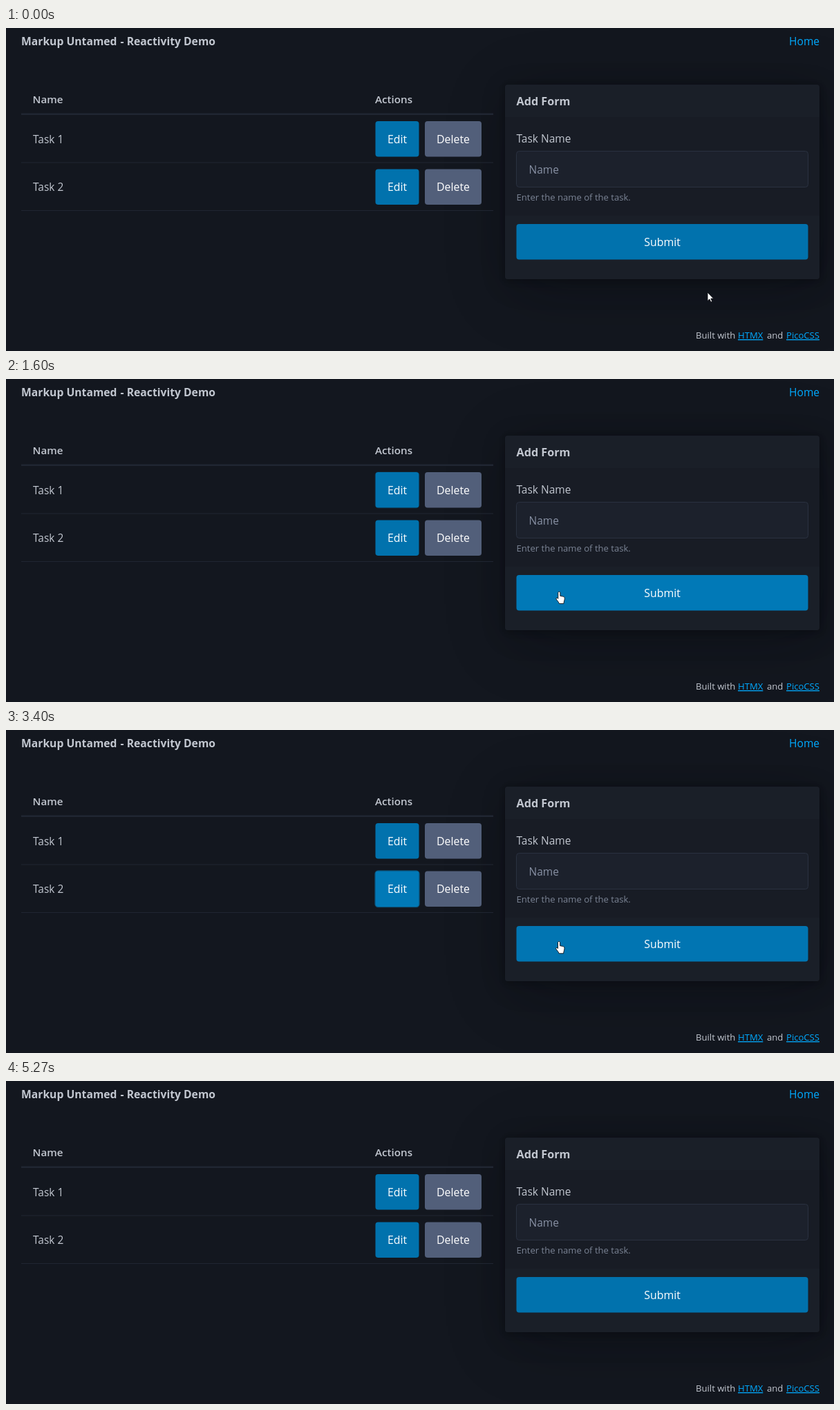
An HTML page for the animation above (5.59 s loop, 1198x468 px).

```html
<!DOCTYPE html>
<html lang="en">
<head>
<meta charset="utf-8">
<title>Reactivity Demo</title>
<style>
  html, body { margin: 0; width: 100%; height: 100%; overflow: hidden; background: #13171f; }
  svg { position: absolute; left: 0; top: 0; display: block; }
  #card {
    position: absolute; left: 722px; top: 82px; width: 455px; height: 281.5px;
    border-radius: 4px;
    background: linear-gradient(#1a1f28 46.5px, #181c25 46.5px 190px, #1a1f28 190px);
    box-shadow:
      .5px 1px 6px rgba(7, 9, 12, .1),
      1px 2px 12px rgba(7, 9, 12, .12),
      3px 7px 40px rgba(7, 9, 12, .16),
      8px 16px 96px rgba(7, 9, 12, .24),
      0 0 0 1px rgba(7, 9, 12, .1);
  }
  text { font: 15.5px "Open Sans", "Noto Sans", sans-serif; fill: #c2c7d0; white-space: pre; }
  .bold { font-size: 15.7px; font-weight: 700; }
  .head { font-size: 16.2px; font-weight: 700; }
  .th { font-size: 15.2px; font-weight: 600; }
  .small { font-size: 13.1px; }
  .muted { fill: #7b8495; }
  .link { fill: #01aaff; }
  .under { text-decoration: underline; text-underline-offset: 2px; text-decoration-thickness: 1px; }
  .end { text-anchor: end; }
  .rule { fill: #202632; }
  #field { fill: #1c212c; stroke: #2a3140; }
  .btn { --base: #0172ad; --hot: #017fc0; --level: 0%; }
  .btn.gray { --base: #525f7a; --hot: #5d6b89; }
  .btn .face { fill: color-mix(in srgb, var(--hot) var(--level), var(--base)); }
  .btn .ring { fill: none; stroke: #01aaff; stroke-opacity: .375; }
  .btn text { font-size: 15.9px; fill: #fff; text-anchor: middle; }
  #arrow, #hand { fill: #fff; stroke: #0b0d12; stroke-width: .9; stroke-linejoin: round; }
</style>
</head>
<body>
<div id="card"></div>
<svg width="1198" height="468" viewBox="0 0 1198 468">
  <text class="bold" x="22" y="25">Markup Untamed</text>
  <text class="bold end" x="303" y="25">- Reactivity Demo</text>
  <text class="link end" x="1177" y="25">Home</text>

  <text class="th" x="38.5" y="109">Name</text>
  <text class="th" x="534" y="109">Actions</text>
  <rect class="rule" x="22" y="123.5" width="683" height="2.5"/>
  <text x="39" y="166.5">Task 1</text>
  <rect class="rule" x="22" y="194.5" width="683" height="1"/>
  <text x="39" y="236">Task 2</text>
  <rect class="rule" x="22" y="264" width="683" height="1"/>

  <text class="head" id="title" x="738.5" y="111.5"></text>
  <text x="738.5" y="165.5">Task Name</text>
  <rect id="field" x="738.5" y="178.5" width="422" height="52" rx="4"/>
  <text id="value" x="756.5" y="211"></text>
  <text class="small muted" x="738.5" y="250">Enter the name of the task.</text>

  <text class="small" x="998" y="450">Built with</text>
  <text class="small link under" x="1059" y="450">HTMX</text>
  <text class="small" x="1101" y="450">and</text>
  <text class="small link under end" x="1177" y="450">PicoCSS</text>

  <g id="buttons"></g>
  <g id="pointer">
    <path id="arrow" d="M0 0V12.5L2.9 9.9 4.8 14.2 6.8 13.3 4.9 9.1H8.7Z"/>
    <path id="hand" transform="translate(-5 0)" d="M5 .5C6 .5 6.6 1.2 6.6 2.1V6.6L10.6 7.4C12.2 7.8 13 8.4 13 10 13 12.6 12 14 11.6 17.8H5.2C4.4 15.3 2 13.3 .8 11.1 .2 9.8 1.6 8.9 2.8 9.8L3.5 10.6V2.1C3.5 1.2 4 .5 5 .5Z"/>
  </g>
</svg>
<script>
const LOOP = 5590, STEP = 1000 / 15, FADE = 200, BTN_H = 51.5;
const $ = id => document.getElementById(id);
const smooth = u => u * u * (3 - 2 * u);
const linear = u => u;

// Pointer stops: time, x, y, sag of the path leading there, easing
const stops = [
  [50, 1015, 383], [420, 570, 170, 80], [700, 570, 168],
  [1020, 791, 296], [1133, 795, 300], [1300, 801, 307], [1750, 800, 308],
  [2240, 584, 247], [2267, 582, 246], [2480, 575, 237], [2560, 575, 237],
  [2800, 772, 291], [2933, 780, 294], [3000, 789, 298], [3133, 800, 306], [3430, 800, 306],
  [3880, 572, 180], [4067, 568, 177], [4260, 566, 174],
  [4540, 771, 300], [4733, 770, 298], [4760, 768, 299],
  [5000, 260, 424, 0, linear], [5200, 66, 456, 0, linear], [5260, -20, 490, 0, linear]
];
// Which task the form edits: task, from, to
const edits = [[1, 585, 1500], [2, 2540, 3360], [1, 4190, 4700]];
// Which Edit button has the focus: task, from, to
const focuses = [[1, 545, 1430], [2, 2490, 3320], [1, 4140, 4580]];

const during = (list, t) => (list.find(([, a, b]) => t >= a && t < b) || [0])[0];

function pointerAt(t) {
  const i = stops.findIndex(s => s[0] > t);
  if (i < 1) return i ? stops.at(-1).slice(1, 3) : stops[0].slice(1, 3);
  const [t0, x0, y0] = stops[i - 1];
  const [t1, x1, y1, sag = 0, ease = smooth] = stops[i];
  const u = ease((t - t0) / (t1 - t0));
  return [x0 + (x1 - x0) * u, y0 + (y1 - y0) * u + sag * 4 * u * (1 - u)];
}

function makeButton(x, y, w, label, options = {}) {
  const { gray = false, task = 0, mode = "any" } = options;
  const g = document.createElementNS("http://www.w3.org/2000/svg", "g");
  g.setAttribute("class", gray ? "btn gray" : "btn");
  g.innerHTML =
    `<rect class="face" x="${x}" y="${y}" width="${w}" height="${BTN_H}" rx="4"/>` +
    `<rect class="ring" x="${x - .5}" y="${y - .5}" width="${w + 1}" height="${BTN_H + 1}" rx="4.5" stroke-width="0"/>` +
    `<text x="${x + w / 2}" y="${y + 31.5}">${label}</text>`;
  $("buttons").append(g);
  return { g, x, y, w, task, mode, ring: g.querySelector(".ring") };
}

const buttons = [1, 2].flatMap(task => {
  const y = task === 1 ? 135 : 204.5;
  return [
    makeButton(534.5, y, 63, "Edit", { task }),
    makeButton(606, y, 82, "Delete", { gray: true })
  ];
}).concat(
  makeButton(738.5, 284, 422, "Submit", { mode: "add" }),
  makeButton(738.5, 284, 206.5, "Cancel", { gray: true, mode: "edit" }),
  makeButton(953.5, 284, 207, "Submit", { mode: "edit" })
);

const shown = (b, t) => b.mode === "any" || (b.mode === "edit") === during(edits, t) > 0;

function hovered(b, t) {
  const [x, y] = pointerAt(t);
  return shown(b, t) && x >= b.x && x <= b.x + b.w && y >= b.y && y <= b.y + BTN_H;
}

const focused = (b, t) => b.task > 0 && during(focuses, t) === b.task;

// Share of the last FADE ms in which a state held: a linear transition
function level(test, t) {
  const n = 20;
  let sum = 0;
  for (let i = 0; i < n; i++) sum += test(t - i * FADE / n);
  return sum / n;
}

function draw(t) {
  const task = during(edits, t);
  $("title").textContent = task ? `Editing (ID: ${task})` : "Add Form";
  $("value").textContent = task ? `Task ${task}` : "Name";
  $("value").style.fill = task ? "#e0e3e7" : "#8891a4";

  for (const b of buttons) {
    b.g.style.display = shown(b, t) ? "" : "none";
    const lit = level(s => hovered(b, s) || focused(b, s), t);
    b.g.style.setProperty("--level", lit * 100 + "%");
    const ring = level(s => focused(b, s), t);
    b.ring.setAttribute("stroke-width", 2.5 * ring);
  }

  const [x, y] = pointerAt(t);
  const over = buttons.some(b => hovered(b, t));
  $("pointer").setAttribute("transform", `translate(${x.toFixed(1)} ${y.toFixed(1)})`);
  $("pointer").style.display = t > 5260 ? "none" : "";
  $("hand").style.display = over ? "" : "none";
  $("arrow").style.display = over ? "none" : "";
}

function tick() {
  const t = performance.now() % LOOP;
  draw(Math.floor((t + 5) / STEP) * STEP);
  requestAnimationFrame(tick);
}
tick();
</script>
</body>
</html>
```
